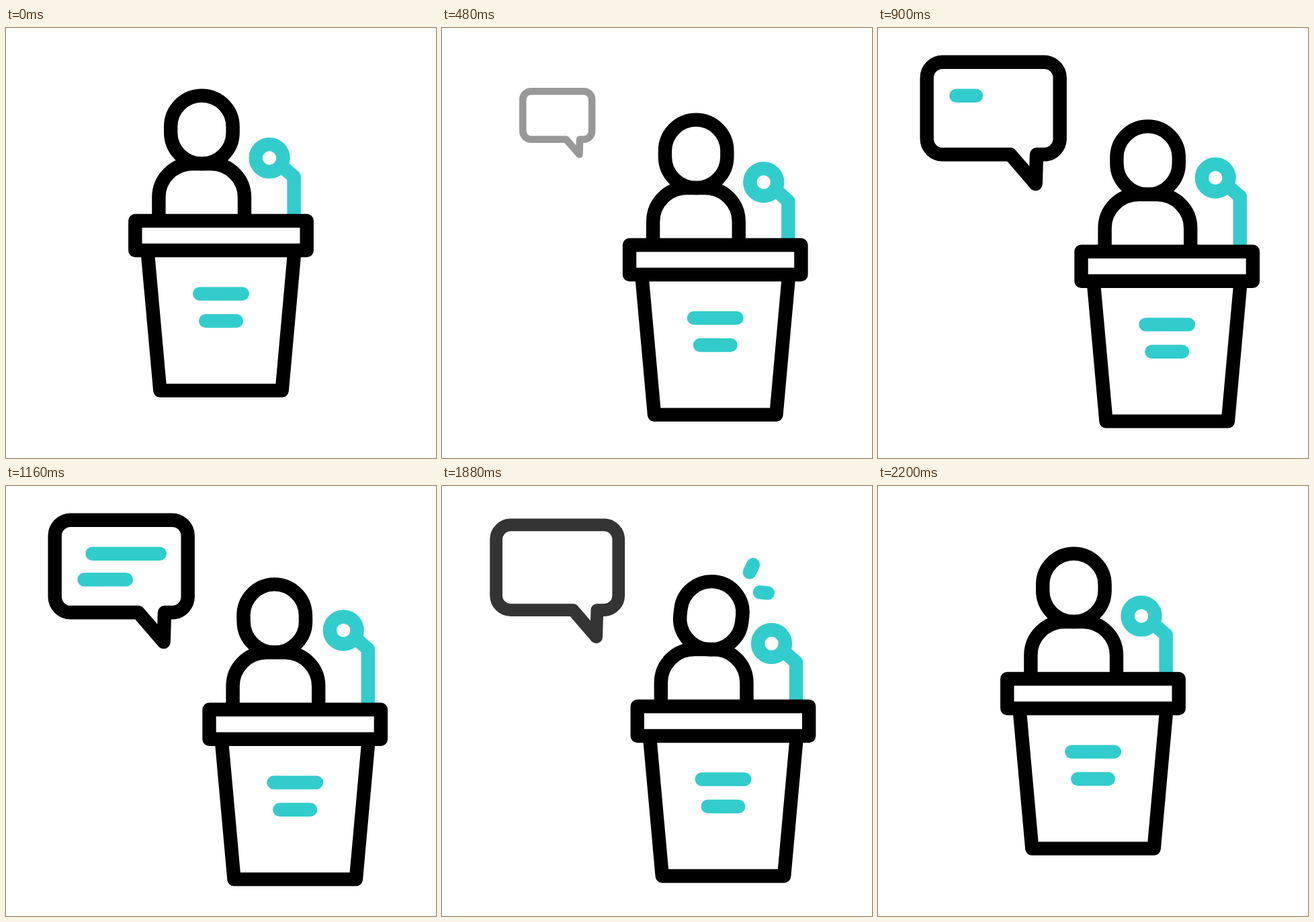
An HTML page for the animation above (2.4 s loop, 640 px wide and 640 px high).

```html
<!DOCTYPE html>
<html lang="en">
<head>
<meta charset="utf-8">
<title>Speaker at a lectern</title>
<style>
  html, body { margin: 0; width: 100%; height: 100%; overflow: hidden; background: #fff; }
  svg { display: block; width: 100%; height: 100%; }
  .ink, .accent { fill: none; stroke-width: 20.4; stroke-linejoin: round; }
  .ink { stroke: #000; }
  .accent { stroke: #3cc; }
  .round { stroke-linecap: round; }
</style>
</head>
<body>
<svg viewBox="0 0 640 640">
  <g id="bubble" class="ink">
    <path d="M96.2 50.7H247.2a23.5 23.5 0 0 1 23.5 23.5V164.8a23.5 23.5 0 0 1-23.5 23.5H236L234.7 232L197 188.3H96.2a23.5 23.5 0 0 1-23.5-23.5V74.2a23.5 23.5 0 0 1 23.5-23.5Z"/>
  </g>
  <g class="accent round">
    <path id="upper"/>
    <path id="lower"/>
  </g>
  <g id="speaker">
    <g class="accent">
      <circle id="mic" cx="392" cy="193.5" r="20.4"/>
      <path id="arm"/>
    </g>
    <g class="ink">
      <path d="M227.4 287V252a50 50 0 0 1 50-50H305a50 50 0 0 1 50 50V287"/>
      <path d="M210.5 331L229.3 539.6H410.7L429.5 331"/>
      <rect x="192.3" y="287" width="255.4" height="44"/>
    </g>
    <g id="head">
      <path class="ink" d="M245.2 146.8a46.2 46.2 0 0 1 92.4 0v9a46.2 46.2 0 0 1-92.4 0Z"/>
      <g class="accent round">
        <path id="rayHigh"/>
        <path id="rayLow"/>
      </g>
    </g>
    <path class="accent round" d="M288.2 395.6H351.8M297.2 436H342.8"/>
  </g>
</svg>
<script>
const LOOP = 2400;
const el = id => document.getElementById(id);
const set = (id, name, value) => el(id).setAttribute(name, value);

const linear = (t, from, to) => Math.min(1, Math.max(0, (t - from) / (to - from)));
const ease = (t, from, to) => {
  const p = linear(t, from, to);
  return p * p * (3 - 2 * p);
};
const mix = (a, b, p) => a + (b - a) * p;

// Draws the part of a segment between two fractions of its length.
function trim(id, [x1, y1, x2, y2], start, end) {
  const point = p => `${mix(x1, x2, p)} ${mix(y1, y2, p)}`;
  set(id, 'd', end - start > 0.001 ? `M${point(start)}L${point(end)}` : '');
}

function drawBubble(t) {
  const size = ease(t, 400, 600) - ease(t, 1800, 2200);
  const scale = mix(0.25, 1, size);
  set('bubble', 'opacity', linear(t, 400, 600) - linear(t, 1800, 2200));
  set('bubble', 'transform', `translate(171.7 141.3) scale(${scale}) translate(-171.7 -141.3)`);
  trim('upper', [128, 100.8, 228.8, 100.8].with(0, 116.4), ease(t, 1100, 1400), ease(t, 800, 1100));
  trim('lower', [116.4, 139.2, 228.8, 139.2], ease(t, 1300, 1600), ease(t, 1000, 1300));
}

function drawSpeaker(t) {
  const shift = ease(t, 200, 600) - ease(t, 1800, 2200);
  set('speaker', 'transform', `translate(${110.2 * shift} ${45.8 * shift})`);

  const lift = 25 * (ease(t, 600, 1100) - ease(t, 1100, 1800));
  set('mic', 'cy', 193.5 - lift);
  set('arm', 'd', `M409 ${204.3 - lift}L428.6 ${221.5 - lift}V287`);

  const tilt = -10 * ease(t, 1100, 1400) + 20 * ease(t, 1500, 1800) - 10 * ease(t, 1800, 2000);
  set('head', 'transform', `rotate(${tilt} 291.4 249.5)`);

  const grow = ease(t, 1700, 1800), fade = ease(t, 1900, 2000);
  trim('rayHigh', [340.8, 80.8, 344.8, 69.3], fade, grow);
  trim('rayLow', [359.2, 108.8, 371.2, 108.6], fade, grow);
}

function draw(t) {
  drawBubble(t);
  drawSpeaker(t);
}

const began = performance.now();
function tick() {
  draw((performance.now() - began) % LOOP);
  requestAnimationFrame(tick);
}
draw(0);
requestAnimationFrame(tick);
</script>
</body>
</html>
```
